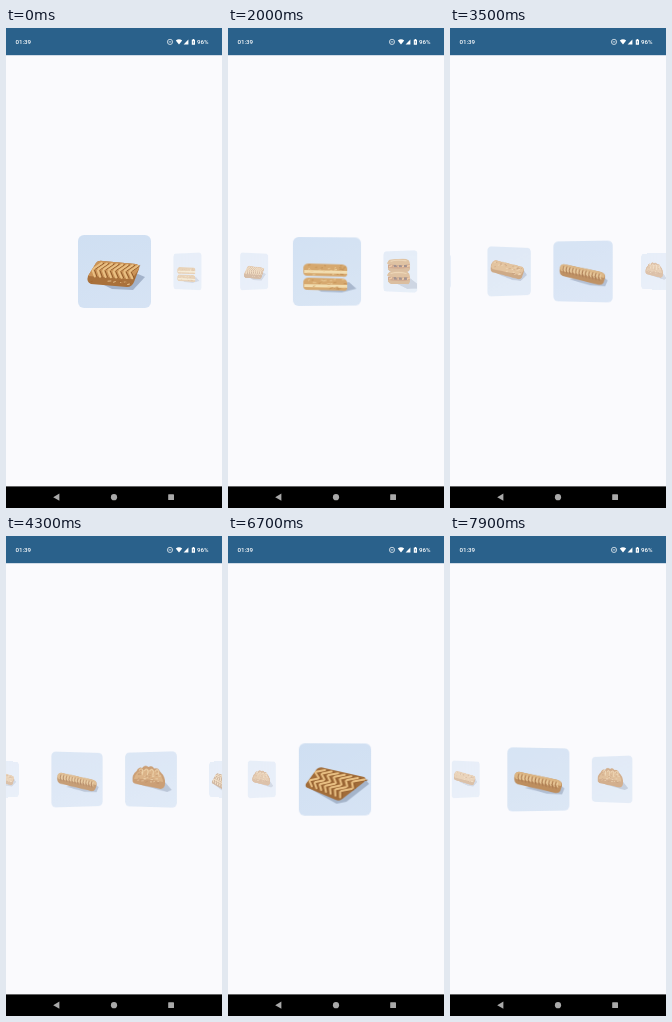
Animation, 216 px wide and 480 px high, one loop 8 s. Source, as an HTML page:

```html
<!DOCTYPE html>
<html lang="en">
<head>
<meta charset="utf-8">
<title>Bakery carousel</title>
<style>
  html, body { margin: 0; width: 100%; height: 100%; overflow: hidden; }
  body { position: relative; background: #fafafd; }
  svg { display: block; }
  text { font: 500 6.2px Roboto, sans-serif; }
  .card {
    position: absolute; left: 71.7px; top: 206.7px; width: 72.6px; height: 72.6px;
    border-radius: 6px; overflow: hidden;
    background: linear-gradient(160deg, #cfdff2, #d6e3f4);
  }
</style>
</head>
<body>
<svg width="216" height="480">
  <rect width="216" height="27.2" fill="#2a618b"/>
  <rect y="458.4" width="216" height="21.6"/>
  <g fill="#fff">
    <text x="9.4" y="16.1">01:39</text>
    <text x="191" y="16.1">96%</text>
    <path d="M162.6 13.9h2.8M166.6 13.9a2.6 2.6 0 1 0-5.2 0a2.6 2.6 0 1 0 5.2 0" fill="none" stroke="#fff" stroke-width=".7"/>
    <path d="M169.8 12.4q3.2-2.4 6.4 0L173 16.6zM177.6 16.6l4.8-5v5zM185.8 11.8h.9v-.7h1.4v.7h.9v5h-3.2z"/>
  </g>
  <path d="M187.4 13v2.4" stroke="#2a618b" stroke-width=".6"/>
  <g fill="#a9a9a9">
    <path d="M47.2 469.2l6.2-3.6v7.2z"/><circle cx="108" cy="469.2" r="3.1"/>
    <rect x="162.2" y="466.3" width="5.8" height="5.8" rx=".4"/>
  </g>
</svg>
<script>
const LOOP = 8000, STEP = 100, SPACING = 72.6;

let seed = 7;
const rand = () => (seed = seed * 16807 % 2147483647) / 2147483647;

const shape = (d, fill) => `<path d="${d}" fill="${fill}"/>`;
const line = (d, color, w) =>
  `<path d="${d}" fill="none" stroke="${color}" stroke-width="${w}" stroke-linecap="round"/>`;
const shadow = d => shape(d, '#8f9fb8b0');
const join = (n, fn) => Array.from({ length: n }, (_, i) => fn(i)).join('');

// point on a quad of corners [top left, top right, bottom right, bottom left]
const at = ([a, b, c, d], u, v) => [0, 1].map(k =>
  ((a[k] * (1 - u) + b[k] * u) * (1 - v) + (d[k] * (1 - u) + c[k] * u) * v).toFixed(1));

// small crumbs scattered over a quad
const flecks = (quad, n, light = '#f0cf9b', dark = '#a5662f') => join(n, i =>
  line(`M${at(quad, rand(), rand())}l${1 + rand() * 2} ${rand() - .8}`, i % 2 ? light : dark, .8));

// rows of slanted strips, leaning left and right in turn
const weave = (quad, cols, rows) => join(cols * rows, i => {
  const u = (i % cols + .5) / cols, row = Math.floor(i / cols), lean = (row % 2 ? .5 : -.5) / cols;
  const strip = (shift, color, w) => line(
    `M${at(quad, u - lean + shift, (row + .1) / rows)}L${at(quad, u + lean + shift, (row + .9) / rows)}`, color, w);
  return strip(.4 / cols, '#8f5a2a', 1) + strip(0, '#e9bf82', 2);
});

const slabTop = [[19, 27], [60, 30], [54, 44], [11, 42]];
const slab =
  shadow('M20 47L60 39 67 42 55 55 34 54z') +
  shape('M10 41L18 28Q20 25 25 26L58 29Q62 30 61 34L56 47Q54 52 49 52L13 49Q8 47 10 41z', '#a9713b') +
  shape('M10 41L18 28Q20 25 25 26L58 29Q62 30 61 34L54 44z', '#cb9458') +
  weave(slabTop, 8, 2) + flecks([[12, 44], [54, 47], [53, 50], [13, 47]], 12);

const layer = y =>
  shape(`M11 ${y + 4}q1-4 6-4l36 1q5 1 5 5v6q-1 3-5 2l-38-1q-4 0-4-4z`, '#d3a263') +
  shape(`M12 ${y + 7}l46 1v3l-46-1z`, '#f1dcab') +
  flecks([[13, y + 2], [54, y + 2], [56, y + 13], [13, y + 12]], 28, '#efcf96', '#bd8546');
const stack = shadow('M20 52L60 48 68 55 52 59 30 58z') + layer(28) + layer(43);

const roll = y =>
  shape(`M10 ${y + 13}q25 5 48 0v4q-1 5-6 5H17q-6-1-7-6z`, '#bd8548') +
  shape(`M11 ${y + 9}q24-3 47 0l-1 6q-24 3-46 0z`, '#a95f2c') +
  join(5, i => line(`M${14 + i * 9.5} ${y + 13}l5-2`, '#e2a05a', 2.6)) +
  join(3, i => shape(`M${23 + i * 11} ${y + 9}h6l1 5h-7z`, '#4e3029')) +
  shape(`M9 ${y + 8}q0-8 9-8 17-2 32 0 8 1 8 9-24 3-49-1z`, '#c48d4d') +
  line(`M17 ${y + 3}q17-3 33 0`, '#e2b679', 2);
const rolls = shadow('M24 56L58 48 72 57 72 66 52 67z') + roll(15) + roll(37);

const bar =
  shadow('M18 41L60 34 66 42 55 51 40 49z') +
  shape('M5 32Q6 21 13 20L56 29Q62 31 61 36L57 46Q55 49 50 48L9 38Q5 37 5 32z', '#b57b41') +
  shape('M6 30Q7 21 13 20L56 29Q62 31 60 35L55 42 8 33z', '#d6a468') +
  flecks([[12, 22], [58, 32], [54, 44], [8, 34]], 36);

const long =
  shadow('M20 46L58 40 67 47 64 54 46 53z') +
  shape('M8 33Q9 27 15 28L59 37Q65 39 64 44L62 50Q60 53 55 52L12 42Q7 40 8 33z', '#b27a42') +
  shape('M8 33Q9 27 15 28L59 37Q65 39 63 44L10 36z', '#d6a86c') +
  join(12, i => {
    const x = 13 + i * 4, y = 30 + i * .85;
    return line(`M${x} ${y}q-2 4 0 8`, '#996030', 1) + line(`M${x + 2} ${y + 1}q-2 3 0 5`, '#e8c690', 1.1);
  });

const pasty =
  shadow('M20 43L56 39 66 50 60 53 44 49z') +
  shape('M11 38Q10 30 17 25 20 19 25 21 29 16 34 20 39 17 42 22 48 21 50 26 58 33 57 42 57 48 51 49L18 43Q11 42 11 38z', '#b97c42') +
  shape('M13 36Q15 28 22 25 38 21 48 27 54 33 54 40 35 35 13 36z', '#cf985a') +
  join(4, i => line(`M${21 + i * 7.5} ${24 + i * .5}q3-4 5 1l-1 5`, '#e6bf86', 1.6)) +
  flecks([[19, 27], [48, 29], [53, 45], [14, 39]], 30);

const latticeTop = [[20, 25], [67, 36], [41, 55], [8, 42]];
const lattice =
  shadow('M10 45L67 36 71 41 48 59 38 61z') +
  shape('M7 41L18 26Q21 23 26 25L66 34Q69 36 66 39L44 56Q41 59 37 57L9 45Q6 44 7 41z', '#a06a36') +
  weave(latticeTop, 7, 4);

const cards = [slab, stack, rolls, bar, long, pasty, lattice].map(art => {
  const el = document.createElement('div');
  el.className = 'card';
  el.innerHTML = `<svg width="73" height="73">${art}</svg>`;
  document.body.append(el);
  return el;
});

const clamp = (v, lo, hi) => Math.min(hi, Math.max(lo, v));
const progress = (t, start, dur) => clamp((t - start) / dur, 0, 1);
const fling = (t, start) => 1 - (1 - progress(t, start, 600)) ** 4;
// several one-page flings at an even gap
const flings = (t, start, gap, n) => {
  let sum = 0;
  for (let i = 0; i < n; i++) sum += fling(t, start + i * gap);
  return sum;
};
const pageAt = t =>
  flings(t, 1405, 575, 3) + flings(t, 3355, 848, 2) +
  .075 * progress(t, 5500, 300) + .945 * fling(t, 5800) -
  flings(t, 7050, 674, 2);

function draw(t) {
  const page = pageAt(t);
  cards.forEach((el, i) => {
    const d = i - page, near = clamp(d, -1, 1), far = Math.abs(near);
    el.style.visibility = Math.abs(d) < 2 ? 'visible' : 'hidden';
    el.style.opacity = 1 - .55 * far;
    el.style.transform = `translateX(${d * SPACING}px) perspective(350px) ` +
      `rotateY(${-40 * near}deg) scale(${1 - .5 * far})`;
  });
}

const began = performance.now();
function tick() {
  const t = (performance.now() - began) % LOOP;
  draw(Math.floor(t / STEP) * STEP);
  requestAnimationFrame(tick);
}
tick();
</script>
</body>
</html>
```
